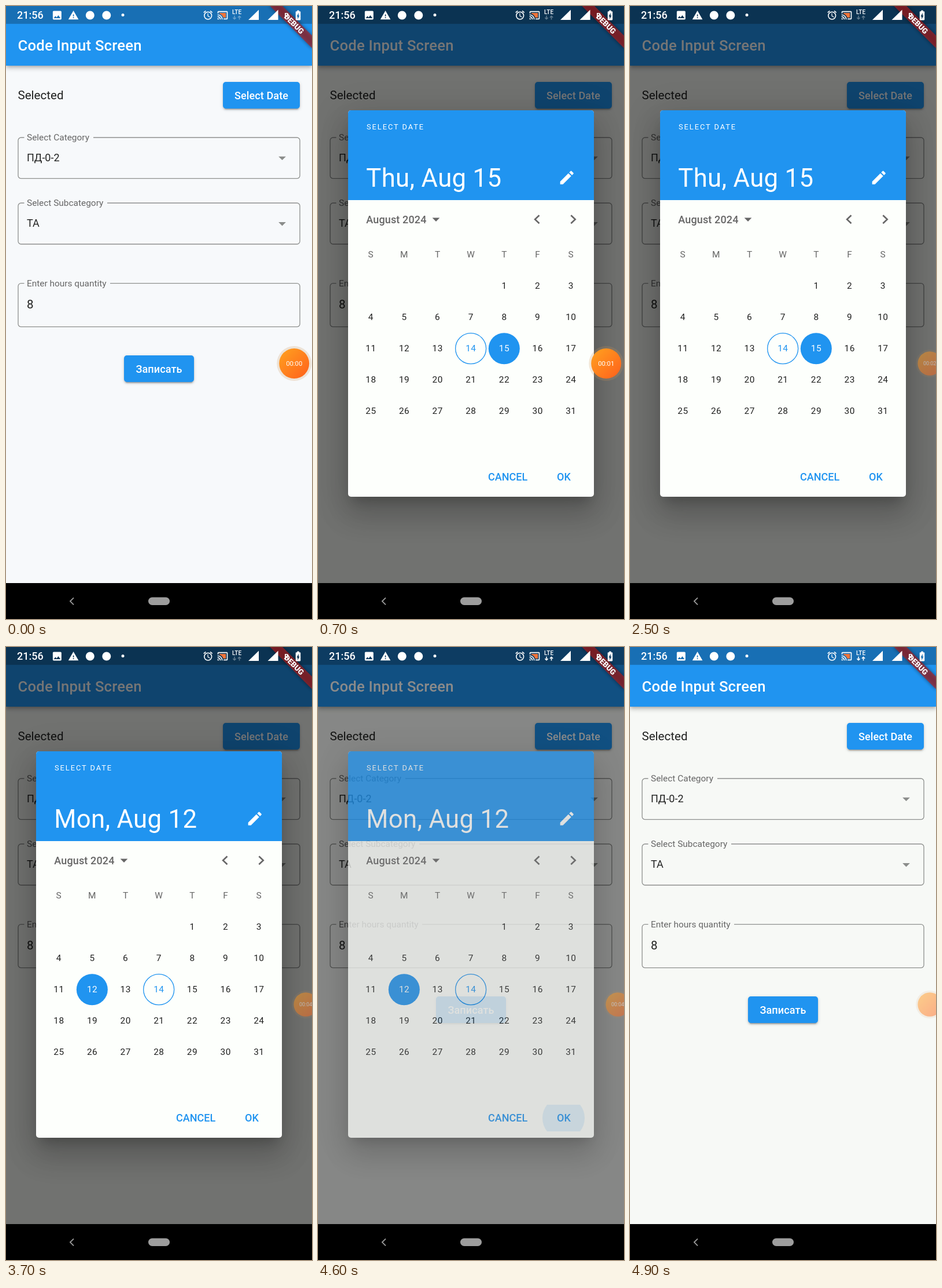
These frames come from a looping animation (529x1058 px, 5200 ms). An HTML page:

```html
<!DOCTYPE html>
<html lang="en">
<head>
<meta charset="utf-8">
<title>Date picker</title>
<style>
  html, body { margin: 0; width: 100%; height: 100%; overflow: hidden; background: #000; }
  #stage { position: relative; width: 529px; height: 1058px; overflow: hidden; font-family: Roboto, sans-serif; }
  #stage div, svg { position: absolute; }
  svg { left: 0; top: 0; font-family: Roboto, sans-serif; }
  #app, #scrim { left: 0; top: 0; width: 529px; height: 996px; overflow: hidden; }
  #scrim { background: #000; }
  #dialog { left: 0; top: 0; width: 529px; height: 1058px; }
  .blue { background: #2094f0; }
  #bar { left: 0; top: 0; width: 529px; height: 102.5px;
    box-shadow: 0 2.6px 5px -1.3px #0003, 0 5px 6.4px #0002, 0 1.3px 13px #0002; }
  .button { height: 46.3px; border-radius: 5px;
    box-shadow: 0 4px 1.3px -2.6px #0003, 0 2.6px 2.6px #0002, 0 1.3px 6.4px #0002; }
  .button.pressed { box-shadow: 0 6.4px 6.4px -4px #0003, 0 10px 13px 1.3px #0002, 0 4px 18px 2.6px #0002; }
  #card { left: 52.4px; top: 180.3px; width: 424.2px; height: 666.5px; border-radius: 5px; overflow: hidden; background: #fdfffc;
    box-shadow: 0 14px 19px -9px #0003, 0 31px 49px 4px #00000024, 0 11.6px 59px 10px #0000001f; }
  #header { left: 0; top: 0; width: 100%; height: 154.5px; }
</style>
</head>
<body>
<div id="stage">
  <div id="app">
    <div id="bar" class="blue"></div>
    <div id="pick" class="button blue" style="left:374.7px;top:131px;width:133.6px"></div>
    <div class="button blue" style="left:204px;top:603px;width:121px"></div>
    <svg id="form" width="529" height="996"></svg>
  </div>
  <div id="scrim"></div>
  <div id="dialog">
    <div id="card"><div id="header" class="blue"></div></div>
    <svg id="calendar" width="529" height="1058"></svg>
  </div>
  <svg id="system" width="529" height="1058"></svg>
</div>
<script>
const $ = id => document.getElementById(id);
const BLUE = '#2094f0', GREY = '#666', INK = '#202120';

const text = (x, y, size, fill, str, attrs = '') =>
  `<text x="${x}" y="${y}" font-size="${size}" fill="${fill}" ${attrs}>${str}</text>`;
const icon = (x, y, scale, d, fill = '#fff') =>
  `<path transform="translate(${x} ${y}) scale(${scale})" fill="${fill}" fill-rule="evenodd" d="${d}"/>`;
const circle = (x, y, r, attrs) => `<circle cx="${x}" cy="${y}" r="${r}" ${attrs}/>`;
const caret = (x, y, fill) => `<path d="M${x - 6.4} ${y}h12.8l-6.4 6.4z" fill="${fill}"/>`;
const MEDIUM = 'font-weight="500"';
const MIDDLE = 'text-anchor="middle"';

// Outlined box whose top edge leaves a gap for the label
function field(top, bottom, gapEnd, label, value, size, baseline) {
  return `<path d="M${gapEnd} ${top}H503a5 5 0 0 1 5 5V${bottom - 5}a5 5 0 0 1 -5 5H26a5 5 0 0 1 -5 -5V${top + 5}a5 5 0 0 1 5 -5H31.5"
    fill="none" stroke="#8e908e" stroke-width="1.3"/>` +
    text(36, top + 5, 15.43, GREY, label) + text(36, baseline, size, INK, value);
}

$('form').innerHTML =
  '<rect width="529" height="30.8" fill="#000" opacity=".25"/>' +
  text(20.5, 76.5, 25.7, '#fff', 'Code Input Screen', MEDIUM + ' letter-spacing=".19"') +
  text(20.5, 161, 20.57, INK, 'Selected') +
  text(441.5, 161, 18, '#fff', 'Select Date', `${MEDIUM} ${MIDDLE} letter-spacing=".1"`) +
  field(227, 297.7, 151, 'Select Category', 'ПД-0-2', 18, 267.6) + caret(477.5, 259.7, '#8b8d8b') +
  field(340, 411, 175, 'Select Subcategory', 'ТА', 18, 381) + caret(477.5, 373, '#8b8d8b') +
  field(478.7, 553.7, 180, 'Enter hours quantity', '8', 20.57, 522) +
  text(264.5, 633, 18, '#fff', 'Записать', `${MEDIUM} ${MIDDLE} letter-spacing=".1"`);

const columnX = c => 91.2 + c * 57.65;
const rowY = r => 483 + r * 54;
const chevron = (x, y, w, h) =>
  `<path d="M${x + w / 2} ${y - h}l${-w} ${h}l${w} ${h}" fill="none" stroke="${GREY}" stroke-width="2.6"/>`;

function drawCalendar(selected, title, tapped, okPressed) {
  let out = text(84, 212.7, 12.86, '#fff', 'SELECT DATE', 'letter-spacing="1.93"') +
    text(83.3, 312, 43.7, '#fff', title, 'letter-spacing=".32"') +
    icon(414.8, 280.7, 1.286, 'M3 17.25V21h3.75L17.81 9.94l-3.75-3.75zM20.71 7.04a1 1 0 0 0 0-1.41l-2.34-2.34a1 1 0 0 0-1.41 0l-1.83 1.83 3.75 3.75z') +
    text(83.3, 375, 18, GREY, 'August 2024', MEDIUM + ' letter-spacing=".13"') + caret(204, 365.5, GREY) +
    chevron(378.8, 368.3, 7.4, 7) + chevron(441, 368.3, -7.4, 7);

  [...'SMTWTFS'].forEach((name, c) => out += text(columnX(c), 434, 15.43, GREY, name, MIDDLE));

  for (let day = 1; day <= 31; day++) {
    const cell = day + 3, x = columnX(cell % 7), y = rowY(Math.floor(cell / 7));
    let fill = INK;
    if (day === selected) {
      out += circle(x, y + .2, 27, `fill="${BLUE}"`);
      fill = '#fff';
    } else if (day === 14) {
      out += circle(x, y + .2, 26.5, `fill="none" stroke="${BLUE}" stroke-width="1.3"`);
      fill = BLUE;
    }
    if (day === tapped) out += circle(x, y + .2, 27, `fill="${BLUE}" opacity=".2"`);
    out += text(x + .2, y + 5.4, 15.43, fill, day, MIDDLE + ' letter-spacing=".5"');
  }

  if (okPressed) out += `<path d="M396 790h57a37 37 0 0 1 0 46h-57a37 37 0 0 1 0 -46z" fill="${BLUE}" opacity=".13"/>`;
  return out + text(294, 819.3, 18, BLUE, 'CANCEL', MEDIUM) + text(413, 819.3, 18, BLUE, 'OK', MEDIUM);
}

const signal = x => `<path d="M${x} 24h18v-17.5z" fill="#fff"/>`;

$('system').innerHTML =
  `<defs>
    <linearGradient id="orange" x1="0" y1="0" x2="1" y2="1"><stop offset=".1" stop-color="#ff9c1f"/><stop offset=".9" stop-color="#ff661c"/></linearGradient>
    <filter id="soft" x="-20%" y="-80%" width="140%" height="260%"><feGaussianBlur stdDeviation="3"/></filter>
  </defs>
  <g transform="translate(529 0) rotate(45)">
    <rect x="-51.5" y="36" width="103" height="15.4" opacity=".45" filter="url(#soft)"/>
    <rect x="-51.5" y="36" width="103" height="15.4" fill="#b71c1c" opacity=".63"/>
    ${text(0, 48.4, 13.1, '#fff', 'DEBUG', MIDDLE + ' font-weight="900"')}
  </g>` +
  text(19, 22.3, 18, '#fff', '21:56', MEDIUM) +
  icon(78.4, 6, .83, 'M21 19V5c0-1.1-.9-2-2-2H5c-1.1 0-2 .9-2 2v14c0 1.1.9 2 2 2h14c1.1 0 2-.9 2-2zM8.5 13.5l2.5 3.01L14.5 12l4.5 6H5z') +
  icon(107, 6.5, .8, 'M1 21h22L12 2zm12-3h-2v-2h2zm0-4h-2v-4h2z') +
  circle(145.3, 16, 7.5, 'fill="#fff"') + circle(173.8, 16, 7.5, 'fill="#fff"') + circle(202, 15.5, 2.5, 'fill="#fff"') +
  icon(339.6, 6.2, .8, 'M22 5.72l-4.6-3.86-1.29 1.53 4.6 3.86zM7.88 3.39L6.6 1.86 2 5.71l1.29 1.53zM12.5 8H11v6l4.75 2.85.75-1.23-4-2.37zM12 4a9 9 0 0 0 0 18 9 9 0 0 0 0-18zm0 16a7 7 0 1 1 0-14 7 7 0 0 1 0 14z') +
  icon(364.9, 6.4, .8, 'M19 7H5v1.63c3.96 1.28 7.09 4.41 8.37 8.37H19z', '#f0743a') +
  icon(364.9, 6.4, .8, 'M1 18v3h3c0-1.66-1.34-3-3-3zm0-4v2c2.76 0 5 2.24 5 5h2c0-3.87-3.13-7-7-7zM1 10v2c4.97 0 9 4.03 9 9h2c0-6.08-4.93-11-11-11zm20-7H3c-1.1 0-2 .9-2 2v3h2V5h18v14h-7v2h7c1.1 0 2-.9 2-2V5c0-1.1-.9-2-2-2z') +
  text(399, 13.8, 10, '#fff', 'LTE', MEDIUM + ' ' + MIDDLE) +
  '<path id="data" d="M395 16.5v6m-2.6 -2.4l2.6 2.6l2.6 -2.6M403.5 23.5v-6m-2.6 2.4l2.6 -2.6l2.6 2.6" fill="none" stroke="#fff" stroke-width="1.6"/>' +
  signal(419) + signal(452.5) + text(485, 20.5, 12, '#fff', 'R', MIDDLE + ' font-weight="700"') +
  icon(494.8, 5.8, .85, 'M15.67 4H14V2h-4v2H8.33C7.6 4 7 4.6 7 5.33v15.33C7 21.4 7.6 22 8.33 22h7.33c.74 0 1.34-.6 1.34-1.33V5.33C17 4.6 16.4 4 15.67 4zM11 20v-5.5H9L13 7v5.5h2z') +
  `<g id="bubble">${circle(0, 0, 30, 'fill="#c89058" opacity=".22"')}${circle(0, 0, 26, 'fill="url(#orange)"')}
    ${text(0, 4.2, 11.3, '#fff', '00:00', MIDDLE + ' id="clock"')}</g>
  <rect y="996" width="529" height="62"/>
  <path d="M117 1021.3l-6 6l6 6" fill="none" stroke="#999" stroke-width="1.9"/>
  <rect x="246" y="1020.5" width="37" height="13.5" rx="6.75" fill="#9d9d9d"/>`;

const DURATION = 5200, STEP = 100;
const TICKS = [600, 1600, 2600, 3700, 4700];
const between = (t, from, to) => t >= from && t < to;
let lastTime = -1;

function render(t) {
  const open = between(t, 700, 4700), closing = open && t >= 4600;
  $('app').style.background = t < 300 ? '#f7f9fb' : '#f7f9f6';
  $('pick').classList.toggle('pressed', between(t, 500, 700));

  $('scrim').style.opacity = open ? (closing ? .46 : .54) : 0;
  $('dialog').style.opacity = open ? (closing ? .74 : 1) : 0;
  const moved = t >= 2800;
  $('calendar').innerHTML = drawCalendar(moved ? 12 : 15, moved ? 'Mon, Aug 12' : 'Thu, Aug 15',
    between(t, 2700, 2800) ? 12 : 0, t >= 4500);

  // The timer bubble docks at the right edge, shrinking and fading
  const dock = Math.min(1, Math.max(0, (t - 1000) / 500));
  $('bubble').setAttribute('transform', `translate(${498.2 + 20 * dock} 617) scale(${1 - .2 * dock})`);
  $('bubble').setAttribute('opacity', 1 - .5 * dock);
  $('clock').textContent = t < 4700 ? '00:0' + TICKS.filter(tick => t >= tick).length : '';
  $('data').setAttribute('opacity', t >= 4200 ? 1 : .35);
}

function frame() {
  const t = Math.floor(performance.now() % DURATION / STEP) * STEP;
  if (t !== lastTime) render(lastTime = t);
  requestAnimationFrame(frame);
}
frame();
</script>
</body>
</html>
```
